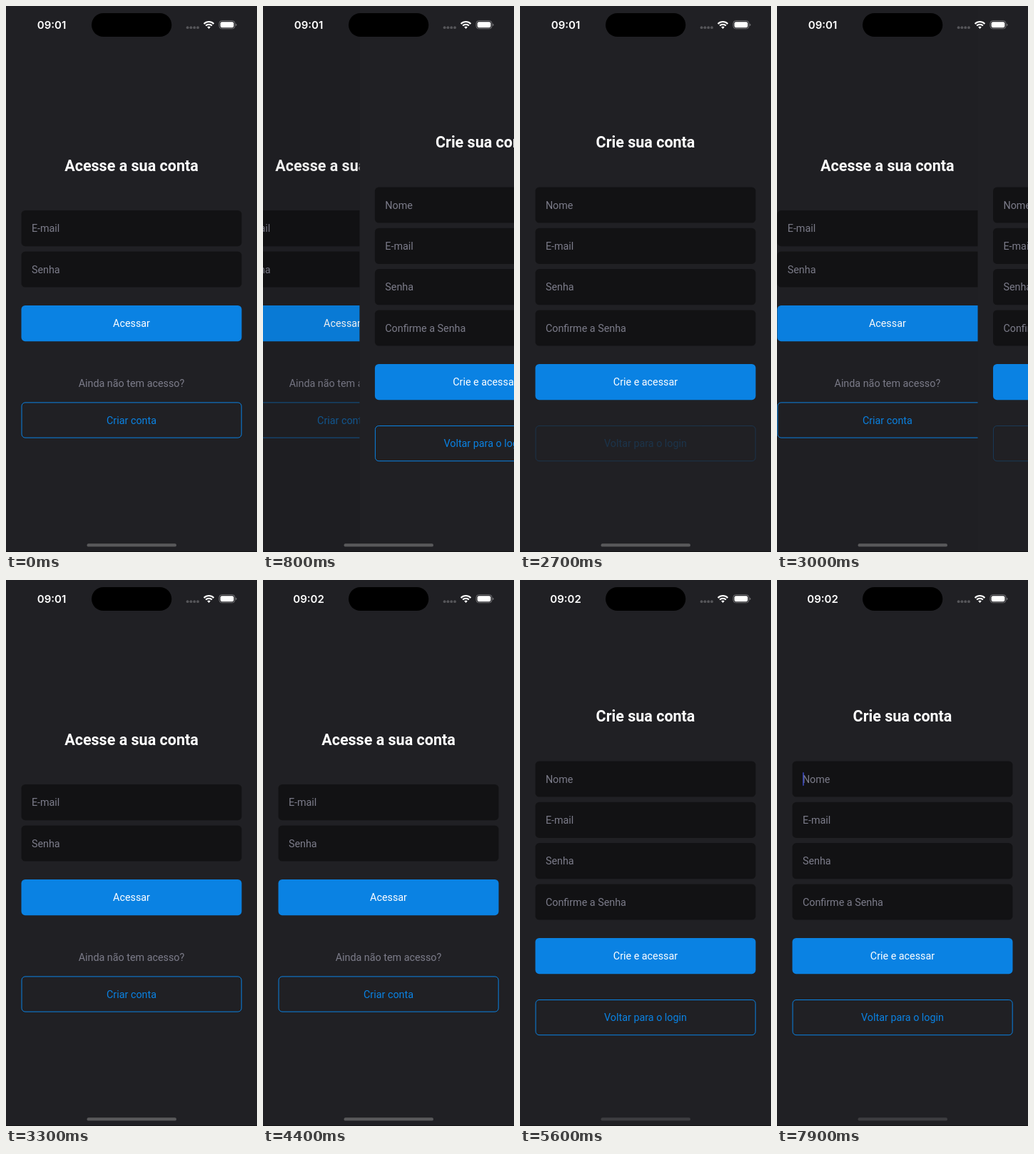
An HTML page that plays this animation: 352 px wide and 764 px high, repeating every 8000 ms.

```html
<!DOCTYPE html>
<html lang="pt-BR">
<head>
<meta charset="utf-8">
<title>Acesso</title>
<style>
  html, body { margin: 0; width: 100%; height: 100%; overflow: hidden; background: #202024; }
  svg { display: block; width: 352px; height: 764px; }
  text { font: 400 14.33px Roboto, sans-serif; fill: #7c7c8a; }
  .mid { text-anchor: middle; }
  .title { font-size: 21.5px; font-weight: 700; fill: #fff; }
  .label { fill: #fff; }
  .link { fill: #0a82e3; }
  .clock { font: 600 15px Inter, sans-serif; fill: #fff; }
</style>
</head>
<body>
<svg viewBox="0 0 352 764">
  <rect width="352" height="764" fill="#202024"/>
  <g id="login"></g>
  <rect id="dim" width="352" height="764" fill="#000"/>
  <g id="signup"></g>
  <rect id="caret" x="36" y="269" width="1.8" height="19" rx=".9" fill="#3d4cc4" opacity=".85"/>

  <text id="clock" class="clock mid" x="64" y="31.6"></text>
  <rect x="120" y="10" width="112.3" height="33" rx="16.5"/>
  <g fill="#56565a">
    <circle cx="254.6" cy="30.2" r="1.9"/><circle cx="259.4" cy="30.2" r="1.9"/>
    <circle cx="264.2" cy="30.2" r="1.9"/><circle cx="269" cy="30.2" r="1.9"/>
  </g>
  <g fill="none" stroke="#fff" stroke-width="2.1">
    <path d="M277.6 24.9a9.7 9.7 0 0 1 13.8 0"/>
    <path d="M280.1 27.6a6.2 6.2 0 0 1 8.8 0"/>
  </g>
  <path d="M284.5 32l-2.3-2.4a3.3 3.3 0 0 1 4.6 0z" fill="#fff"/>
  <rect x="299" y="20.7" width="22" height="11" rx="3.6" fill="none" stroke="#7b7b7e" stroke-width=".9"/>
  <rect x="300.6" y="22.2" width="18.8" height="8" rx="2.3" fill="#fff"/>
  <path d="M322.2 24.5a1.9 1.9 0 0 1 0 3.6z" fill="#7b7b7e"/>
  <rect id="bar" x="113.5" y="752.2" width="125.5" height="4.4" rx="2.2"/>
  <rect y="763" width="352" height="1" fill="#131315"/>
</svg>
<script>
const $ = id => document.getElementById(id);
const LOOP = 8000, STEP = 100, W = 352;

const text = (s, y, cls, x = W / 2) =>
  `<text class="${cls}" x="${x}" y="${y}">${s}</text>`;
const box = (y, style) =>
  `<rect x="21.5" y="${y}" width="309" height="50.2" rx="5.4" ${style}/>`;
const field = (s, y) => box(y, 'fill="#121214"') + text(s, y + 30.2, '', 35.9);
const solid = (s, y) => box(y, 'fill="#0a82e3"') + text(s, y + 30.2, 'label mid');
const outline = (s, y, id) =>
  `<g id="${id}"><rect x="22" y="${y + .5}" width="308.2" height="49.2" rx="5" fill="none"
    stroke="#0a82e3" stroke-width="1"/>${text(s, y + 30.2, 'link mid')}</g>`;

$('login').innerHTML =
  text('Acesse a sua conta', 230.7, 'title mid') +
  field('E-mail', 286) + field('Senha', 343.4) +
  solid('Acessar', 419) +
  text('Ainda não tem acesso?', 533, 'mid') +
  outline('Criar conta', 554.4, 'create');

$('signup').innerHTML =
  `<rect width="${W}" height="764" fill="#202024"/>` +
  text('Crie sua conta', 197.9, 'title mid') +
  ['Nome', 'E-mail', 'Senha', 'Confirme a Senha']
    .map((s, i) => field(s, 253.4 + i * 57.33)).join('') +
  solid('Crie e acessar', 501) +
  outline('Voltar para o login', 587, 'back');

// Critically damped spring, 0 to 1
function spring(ms) {
  if (ms <= 0) return 0;
  const k = ms * 0.01825, left = (1 + k) * Math.exp(-k);
  return left < 0.002 ? 1 : 1 - left;
}

// Share of the sign-up screen that has slid in
function slide(t) {
  if (t < 2836) return spring(t - 686);
  if (t < 5086) return 1 - spring(t - 2836);
  return spring(t - 5086);
}

// Touch feedback: drops to 0.2, then eases back over 250 ms
function touch(t, down, up) {
  if (t < down) return 1;
  const u = Math.min(1, Math.max(0, (t - up) / 250));
  return 0.2 + 0.8 * (u < 0.5 ? 2 * u * u : 1 - 2 * (1 - u) ** 2);
}

function draw(ms) {
  const t = Math.floor((ms % LOOP) / STEP) * STEP;
  const p = slide(t);
  $('login').setAttribute('transform', `translate(${-0.3 * W * p} 0)`);
  $('signup').setAttribute('transform', `translate(${W * (1 - p)} 0)`);
  $('dim').setAttribute('opacity', 0.1 * p);
  $('create').setAttribute('opacity', t < 4900 ? touch(t, 500, 675) : touch(t, 4900, 5075));
  $('back').setAttribute('opacity', touch(t, 2700, 2950));
  $('clock').textContent = t < 3900 ? '09:01' : '09:02';
  $('bar').setAttribute('fill', t < 5100 ? '#59595b' : '#3d3d40');
  $('caret').style.display = t >= 7900 ? '' : 'none';
}

const start = performance.now();
function tick() {
  draw(performance.now() - start);
  requestAnimationFrame(tick);
}
tick();
</script>
</body>
</html>
```
